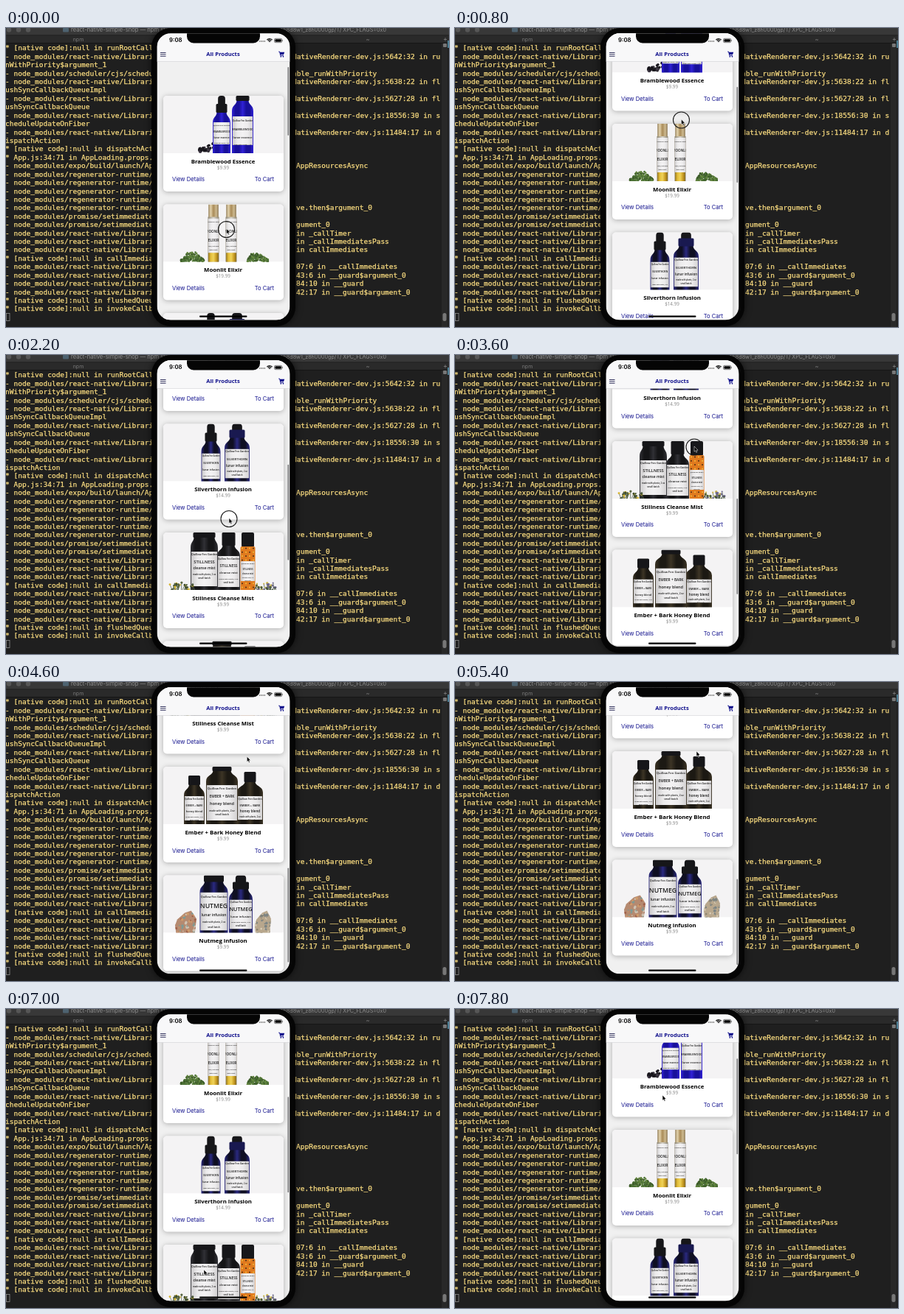
An HTML page with a canvas that plays this animation: 600 px wide and 406 px high, repeating every 8000 ms.

```html
<!DOCTYPE html>
<html lang="en">
<head>
<meta charset="utf-8">
<title>Shop scroll</title>
<style>
html, body { margin: 0; width: 100%; height: 100%; overflow: hidden; background: #1f1f1f; }
canvas { display: block; width: 600px; height: 406px; }
</style>
</head>
<body>
<canvas id="stage"></canvas>
<script>
const W = 600, H = 406, LOOP = 8000, STEP = 200;
const NAVY = '#10108c';
const MONO = '"DejaVu Sans Mono", monospace';
const UI = 'Inter, sans-serif';
const SANS = '"Open Sans", sans-serif';
const BRAND = 'Quillow Fen Garden';

const canvas = document.getElementById('stage');
const ctx = canvas.getContext('2d');
const dpr = window.devicePixelRatio || 1;
canvas.width = W * dpr;
canvas.height = H * dpr;

// ---------- helpers ----------
function rect(x, y, w, h, color) {
  ctx.fillStyle = color;
  ctx.fillRect(x, y, w, h);
}

function roundPath(x, y, w, h, r) {
  ctx.beginPath();
  ctx.roundRect(x, y, w, h, r);
}

function round(x, y, w, h, r, color) {
  roundPath(x, y, w, h, r);
  ctx.fillStyle = color;
  ctx.fill();
}

function dot(x, y, r, color) {
  ctx.beginPath();
  ctx.arc(x, y, r, 0, Math.PI * 2);
  ctx.fillStyle = color;
  ctx.fill();
}

function poly(points, color) {
  ctx.beginPath();
  points.forEach(([x, y]) => ctx.lineTo(x, y));
  ctx.closePath();
  ctx.fillStyle = color;
  ctx.fill();
}

function text(str, x, y, font, color, align = 'left') {
  ctx.font = font;
  ctx.fillStyle = color;
  ctx.textAlign = align;
  ctx.textBaseline = 'middle';
  ctx.fillText(str, x, y);
}

function sweep(x, w, ...colors) {
  const g = ctx.createLinearGradient(x, 0, x + w, 0);
  colors.forEach((c, i) => g.addColorStop(i / (colors.length - 1), c));
  return g;
}

function random(seed) {
  return () => (seed = (seed * 16807) % 2147483647) / 2147483647;
}

// Monotone cubic through [time, value...] keys
function track(keys, t, k) {
  const slope = i => (keys[i + 1][k] - keys[i][k]) / (keys[i + 1][0] - keys[i][0]);
  const tangent = i => {
    if (i === 0) return slope(0);
    if (i === keys.length - 1) return slope(i - 1);
    const a = slope(i - 1), b = slope(i);
    return a * b <= 0 ? 0 : 2 * a * b / (a + b);
  };
  let i = 0;
  while (i < keys.length - 2 && t >= keys[i + 1][0]) i++;
  const d = keys[i + 1][0] - keys[i][0];
  const u = (t - keys[i][0]) / d, v = 1 - u;
  return keys[i][k] * (1 + 2 * u) * v * v + tangent(i) * d * u * v * v +
    keys[i + 1][k] * u * u * (3 - 2 * u) - tangent(i + 1) * d * u * u * v;
}

// ---------- terminal ----------
const RN = '- node_modules/react-native/Libraries/';
const RENDERER = RN + 'Renderer/implementations/ReactNativeRenderer-dev.js:';
const REGEN = '- node_modules/regenerator-runtime/runtime.js';
const PROMISE = '- node_modules/promise/setimmediate/';
const NATIVE = '* [native code]:null in ';
// A second entry is the part that shows right of the phone
const LOG = [
  [NATIVE + 'runRootCallback'],
  [RENDERER + '5642:32 in ru'],
  ['nWithPriority$argument_1'],
  ['- node_modules/scheduler/cjs/scheduler.development.js:653:23 in unstable_runWithPriority'],
  [RENDERER + '5638:22 in fl'],
  ['ushSyncCallbackQueueImpl'],
  [RENDERER + '5627:28 in fl'],
  ['ushSyncCallbackQueue'],
  [RENDERER + '18556:30 in s'],
  ['cheduleUpdateOnFiber'],
  [RENDERER + '11484:17 in d'],
  ['ispatchAction'],
  [NATIVE + 'dispatchAction'],
  ['* App.js:34:71 in AppLoading.props.onFinish'],
  ['- node_modules/expo/build/launch/AppLoading.js', 'AppResourcesAsync'],
  [REGEN], [REGEN], [REGEN], [REGEN],
  [REGEN, 've.then$argument_0'],
  [PROMISE + 'core.js'],
  [PROMISE + 'core.js', 'gument_0'],
  [RN, 'in _callTimer'],
  [RN, 'in _callImmediatesPass'],
  [RN, 'in callImmediates'],
  [NATIVE + 'callImmediates'],
  [RN, '07:6 in __callImmediates'],
  [RN, '43:6 in __guard$argument_0'],
  [RN, '84:10 in __guard'],
  [RN, '42:17 in __guard$argument_0'],
  [NATIVE + 'flushedQueue'],
  [NATIVE + 'invokeCallbackAndReturn']
];

// The thin outline gives the heavier strokes of the terminal's type
function logText(str, x, y) {
  text(str, x, y, '9.5px ' + MONO, '#fbdd80');
  ctx.strokeStyle = '#fbdd80';
  ctx.lineWidth = 0.25;
  ctx.strokeText(str, x, y);
}

function drawTerminal() {
  rect(0, 0, W, H, '#1f1f1f');
  rect(0, 0, W, 10, '#383838');
  rect(0, 10, W, 10.5, '#2a2a2a');
  rect(0, 9.5, W, 0.7, '#181818');
  rect(0, 20, W, 0.7, '#111');
  [4, 17, 30].forEach(x => dot(x, 2.5, 3.2, '#565656'));
  round(77, 0, 8, 5.5, 1, '#4d6270');
  text('react-native-simple-shop — npm start', 88, 2.5, '7.6px ' + UI, '#8e8e8e');
  text('b4b8d8w1_z8h0000gp/T/ XPC_FLAGS=0x0', 515, 2.5, '7.2px ' + UI, '#8e8e8e', 'right');
  text('npm', 98, 15.5, '7px ' + UI, '#777', 'center');
  text('~', 490, 15.5, '7px ' + UI, '#777', 'center');
  text('+', 595, 15.5, '9px ' + UI, '#888', 'center');
  rect(590, 21, 8, H - 21, '#282828');
  round(592, 21, 5, 5, 1, '#777');
  rect(598, 17, 2, 10, '#4b7d92');
  round(591.5, 387, 5, 11, 2.5, '#777');

  LOG.forEach(([left, right], i) => {
    const y = 27.9 + i * 11.42;
    logText(left, -1, y);
    if (right) logText(right, 393, y);
  });
  ctx.strokeStyle = '#8c8c8c';
  ctx.lineWidth = 0.8;
  ctx.strokeRect(0.5, 387.5, 4.5, 10);
}

// ---------- product pictures, relative to the card's top at stage x ----------
function bottle({ x, w, top, cap, capTop = 0, bulb = 0, color, label, lines, ink = '#161619' }) {
  const mid = x + w / 2, half = cap / 2;
  if (bulb) round(mid - half * 0.65, capTop, half * 1.3, bulb + 2, [4, 4, 0, 0], '#161619');

  const [dark, light] = color;
  const low = top + 15;
  ctx.beginPath();
  ctx.moveTo(mid - half + 1, top);
  ctx.bezierCurveTo(mid - half + 1, top + 7, x, top + 6, x, low);
  ctx.lineTo(x, 80);
  ctx.lineTo(x + w, 80);
  ctx.lineTo(x + w, low);
  ctx.bezierCurveTo(x + w, top + 6, mid + half - 1, top + 7, mid + half - 1, top);
  ctx.fillStyle = sweep(x, w, light, dark, dark, light, dark, dark, light);
  ctx.fill();
  round(mid - half, capTop + bulb, cap, top - capTop - bulb + 1, 1.5, ink);

  drawLabel(x + 0.7, label[0], w - 1.4, label[1], lines);
}

// Lines are [text, size, y]
function drawLabel(x, y, w, h, lines) {
  ctx.save();
  roundPath(x, y, w, h, 0.8);
  ctx.clip();
  rect(x, y, w, h, sweep(x, w, '#cbc9ca', '#ecebec', '#f3f2f3', '#ecebec', '#d3d1d2'));
  lines.forEach(([str, size, ly]) =>
    text(str, x + w / 2, ly, `600 ${size}px ${SANS}`, '#1c1c1c', 'center'));
  ctx.restore();
}

function label(name, kind, y, w, gap = 10) {
  return [
    [BRAND, w / 9.6, y],
    [name, Math.min(9, w / (name.length * 0.69)), y + gap],
    [kind, w / 7.2, y + gap * 1.9],
    ['made with plants, 2 oz', w / 12.5, y + gap * 2.7],
    ['small batch', w / 12, y + gap * 3.2]
  ];
}

const COBALT = ['#18109a', '#3021d6'];
const INDIGO = ['#0f0f22', '#2a2980'];
const BLACK = ['#151517', '#303035'];
const AMBER = ['#1c1913', '#3c3425'];

function drawBerries() {
  const rnd = random(11);
  for (let i = 0; i < 34; i++) {
    const u = rnd();
    dot(262 + u * 23, 76 - rnd() * (5 + u * 8), 1.4 + rnd(), i % 4 ? '#17151b' : '#3a3440');
  }
}

function drawMoss(x, w, h, peak, seed) {
  const rnd = random(seed);
  for (let i = 0; i < 160; i++) {
    const u = rnd();
    const rise = h * Math.min(1, 0.25 + 1.1 * (u < peak ? u / peak : (1 - u) / (1 - peak)));
    dot(x + u * w, 78 - rnd() * rise, 1.3, ['#3d5c2a', '#4d7236', '#64863f'][i % 3]);
  }
}

function drawHerbs(x, w, tints, seed) {
  const rnd = random(seed);
  for (let i = 0; i < 30; i++) {
    const px = x + rnd() * w, py = 79 - rnd() * 11;
    ctx.strokeStyle = '#46533b';
    ctx.lineWidth = 0.7;
    ctx.beginPath();
    ctx.moveTo(px, py);
    ctx.lineTo(px + (rnd() - 0.5) * 9, 79);
    ctx.stroke();
    dot(px, py, 1 + rnd() * 0.7, tints[i % tints.length]);
  }
}

function drawCrystal(x, w, tints, seed) {
  ctx.save();
  ctx.beginPath();
  [[0.1, 60], [0.45, 51], [0.75, 48], [1, 59], [0.92, 79], [0.05, 79], [0, 68]]
    .forEach(([u, y]) => ctx.lineTo(x + u * w, y));
  ctx.clip();
  rect(x, 47, w, 33, tints[0]);
  const rnd = random(seed);
  for (let i = 0; i < 60; i++) {
    dot(x + rnd() * w, 48 + rnd() * 31, 0.7 + rnd() * 1.3, tints[i % tints.length]);
  }
  ctx.restore();
}

function drawRoller(x) {
  const w = 15;
  rect(x + 0.7, 0, w - 1.4, 18, sweep(x, w, '#86704c', '#e2d2ac', '#a98b58', '#cdb98f', '#7d6846'));
  rect(x, 17, w, 62, sweep(x, w, '#8d8570', '#d9d5cc', '#8d8570'));
  rect(x + 0.6, 65, w - 1.2, 14, sweep(x, w, '#8a6d1c', '#e3bd38', '#f0d35a', '#c99c22', '#7c611a'));
  drawLabel(x, 19, w, 47, [
    [BRAND, 2, 24], ['MOONLIT', 4.6, 37], ['ELIXIR', 5, 49],
    ['calm, soft glow', 2, 57], ['with Mint', 2.4, 62]
  ]);
}

const PRODUCTS = [
  { name: 'Bramblewood Essence', price: '$9.99', draw() {
    drawBerries();
    bottle({ x: 280, w: 24, top: 22, cap: 15, bulb: 11, color: COBALT, label: [36, 30],
      lines: label('BRAMBLEWOOD', 'lunar essence', 40, 23, 9) });
    bottle({ x: 306, w: 29, top: 6, cap: 18, color: COBALT, label: [28, 39],
      lines: label('BRAMBLEWOOD', 'lunar essence', 34, 28, 12) });
  } },
  { name: 'Moonlit Elixir', price: '$19.99', draw() {
    drawMoss(237, 31, 13, 0.45, 5);
    drawMoss(327, 28, 12, 0.3, 9);
    drawRoller(273.5);
    drawRoller(297.5);
  } },
  { name: 'Silverthorn Infusion', price: '$14.99', draw() {
    bottle({ x: 264.5, w: 26, top: 23, cap: 16, bulb: 12, color: INDIGO, label: [40, 35],
      lines: label('SILVERTHORN', 'lunar infusion', 44, 24, 10) });
    bottle({ x: 296, w: 34, top: 18, cap: 21, bulb: 8, color: INDIGO, label: [34, 40],
      lines: label('SILVERTHORN', 'lunar infusion', 38, 32, 10), ink: '#191950' });
  } },
  { name: 'Stillness Cleanse Mist', price: '$9.99', draw() {
    bottle({ x: 250, w: 37, top: 6, cap: 30, color: BLACK, label: [26, 47],
      lines: label('STILLNESS', 'cleanse mist', 30, 36, 10) });
    bottle({ x: 286, w: 31, top: 17, cap: 18, color: BLACK, label: [32, 42],
      lines: label('STILLNESS', 'cleanse mist', 36, 30, 10) });
    round(319, 0, 17, 20, 2, '#17171a');
    round(317.5, 19, 20, 61, 2, '#e07a1e');
    for (let i = 0; i < 11; i++) {
      for (let j = 0; j < 4; j++) {
        dot(320 + j * 5, 21.5 + i * 5.3, 1, (i + j) % 2 ? '#4a2c18' : '#f1bf3f');
      }
    }
    drawLabel(318, 39, 19, 27, label('STILLNESS', 'cleanse mist', 43, 18, 7));
    drawHerbs(222, 31, ['#d9b62c', '#3d4d2c', '#54623e'], 21);
    drawHerbs(338, 27, ['#6d6690', '#48583d', '#c9b44a'], 33);
  } },
  { name: 'Ember + Bark Honey Blend', price: '$9.99', draw() {
    bottle({ x: 241, w: 28, top: 24, capTop: 12, cap: 16, color: AMBER, label: [40, 33],
      lines: label('EMBER + BARK', 'honey blend', 44, 27, 9) });
    bottle({ x: 313, w: 35, top: 20, capTop: 7, cap: 16, color: AMBER, label: [40, 32],
      lines: label('EMBER + BARK', 'honey blend', 44, 33, 9) });
    bottle({ x: 271, w: 43, top: 5, cap: 26, color: AMBER, label: [25, 48],
      lines: label('EMBER + BARK', 'honey blend', 30, 40, 11) });
  } },
  { name: 'Nutmeg infusion', price: '$9.99', draw() {
    drawCrystal(229, 29, ['#b58a70', '#cf9b6b', '#7d9a94', '#cfc3b2', '#a0604a'], 7);
    drawCrystal(337, 22, ['#b8a78d', '#8b826f', '#d8cdb6', '#7d8585'], 13);
    bottle({ x: 262.5, w: 38, top: 8, cap: 27, color: INDIGO, label: [23, 52],
      lines: label('NUTMEG', 'lunar infusion', 29, 36, 13) });
    bottle({ x: 302, w: 32, top: 18, cap: 22, bulb: 9, color: INDIGO, label: [33, 40],
      lines: label('NUTMEG', 'lunar infusion', 37, 30, 10) });
  } }
];

// ---------- phone ----------
const SCREEN = { x: 204.5, y: 7.3, w: 180, h: 389 };
const CARD_X = 213, CARD_W = 163, CARD_H = 130, PITCH = 147.5, MID = 294.5;

function drawCard({ name, price, draw }, y) {
  ctx.save();
  ctx.translate(0, y);
  ctx.save();
  ctx.shadowColor = 'rgba(0,0,0,.28)';
  ctx.shadowBlur = 7 * dpr;
  ctx.shadowOffsetY = dpr;
  round(CARD_X, 0, CARD_W, CARD_H, 5, '#fff');
  ctx.restore();

  ctx.save();
  roundPath(CARD_X, 0, CARD_W, 78, [5, 5, 0, 0]);
  ctx.clip();
  rect(CARD_X, 0, CARD_W, 78, '#f4f3f4');
  draw();
  ctx.restore();

  text(name, MID - 0.5, 89.5, `bold 7.8px ${SANS}`, '#000', 'center');
  text(price, MID - 0.5, 98.3, `6.3px ${SANS}`, '#888', 'center');
  text('View Details', 225, 114.2, '7.6px ' + UI, NAVY);
  text('To Cart', 363, 114.2, '7.6px ' + UI, NAVY, 'right');
  ctx.restore();
}

// The bar shrinks while the list is pulled past either end
function drawScrollbar(first) {
  const above = Math.max(0, first - 55);
  const below = Math.max(0, -470 - first);
  const slide = 73.5 - first * 0.373;
  const top = Math.max(53, slide + below * 0.35);
  const bottom = Math.min(384, Math.max(53, slide) + 130 - above);
  round(381.5, top, 1.6, bottom - top, 0.8, '#757577');
}

function drawStatus() {
  rect(SCREEN.x, SCREEN.y, SCREEN.w, 38.2, '#f8f8f9');
  rect(SCREEN.x, 45, SCREEN.w, 0.5, '#c9c9cc');
  text('9:08', 221, 17, `600 7.8px ${UI}`, '#000');
  for (let i = 0; i < 4; i++) dot(343.8 + i * 2.2, 18, 0.65, '#222');

  ctx.strokeStyle = '#000';
  ctx.lineWidth = 1.1;
  [1.4, 3.2, 5].forEach(r => {
    ctx.beginPath();
    ctx.arc(357, 19.5, r, -Math.PI * 0.76, -Math.PI * 0.24);
    ctx.stroke();
  });
  ctx.lineWidth = 0.5;
  roundPath(363.5, 14.3, 10.2, 5.4, 1.4);
  ctx.stroke();
  round(364.4, 15.2, 8.4, 3.6, 0.8, '#000');
  rect(374.2, 16.2, 0.7, 1.7, '#555');

  [33, 35.4, 37.8].forEach(y => rect(209, y, 7.5, 0.9, '#20204f'));
  text('All Products', 294, 36, `bold 7.6px ${SANS}`, NAVY, 'center');

  poly([[369, 31.7], [370.8, 31.7], [371.2, 32.8], [377.2, 32.8], [376, 36.3], [371.9, 36.3],
    [372.1, 37], [376, 37], [376, 37.8], [371.4, 37.8], [370.2, 32.5], [369, 32.5]], NAVY);
  dot(372.3, 38.8, 0.85, NAVY);
  dot(375.5, 38.8, 0.85, NAVY);
}

function drawPhone(first) {
  ctx.save();
  ctx.shadowColor = 'rgba(0,0,0,.6)';
  ctx.shadowBlur = 10 * dpr;
  round(197, 0, 195, 405, 26, '#050505');
  ctx.restore();

  ctx.save();
  roundPath(SCREEN.x, SCREEN.y, SCREEN.w, SCREEN.h, 18.5);
  ctx.clip();
  rect(SCREEN.x, SCREEN.y, SCREEN.w, SCREEN.h, '#f0f0f0');
  PRODUCTS.forEach((product, i) => {
    const y = first + i * PITCH;
    if (y > -140 && y < H) drawCard(product, y);
  });
  drawScrollbar(first);
  drawStatus();
  round(245, 0, 99, 20.5, 9, '#050505');
  round(262, 390.6, 64.5, 2.2, 1.1, '#000');
  ctx.restore();
}

function drawPointer(x, y, pressed) {
  if (pressed) {
    ctx.beginPath();
    ctx.arc(x, y, 11, 0, Math.PI * 2);
    ctx.strokeStyle = '#1a1a1a';
    ctx.lineWidth = 1.1;
    ctx.stroke();
  }
  ctx.save();
  ctx.translate(x, y - 1);
  poly([[0, 0], [0, 7.2], [1.6, 5.8], [2.7, 8.3], [3.9, 7.8], [2.9, 5.3], [5, 5.2]], '#000');
  ctx.strokeStyle = '#fff';
  ctx.lineWidth = 0.5;
  ctx.stroke();
  ctx.restore();
}

// ---------- motion ----------
// [time, top of the first card]
const SCROLL = [
  [0, 92], [800, -17.5], [1200, -85], [1800, -165], [2200, -201.5], [3600, -325.5],
  [4400, -465], [5400, -496], [5800, -490], [7000, -122.5], [7800, 16.5]
];
// [time, x, y]
const POINTER = [
  [0, 298.5, 273.5], [800, 306.5, 125], [1000, 308, 112], [1800, 302, 260], [2200, 302, 222.5],
  [3600, 324, 125], [5400, 327, 95], [5800, 300, 130], [7000, 268, 355], [7800, 281, 118]
];
const PRESSES = [[0, 1000], [2000, 3800], [5800, 6600]];

function frame(now) {
  const t = Math.floor(now % LOOP / STEP) * STEP;
  ctx.setTransform(dpr, 0, 0, dpr, 0, 0);
  drawTerminal();
  drawPhone(track(SCROLL, t, 1));
  const pressed = PRESSES.some(([from, to]) => t >= from && t < to);
  drawPointer(track(POINTER, t, 1), track(POINTER, t, 2), pressed);
  requestAnimationFrame(frame);
}
requestAnimationFrame(frame);
</script>
</body>
</html>
```
